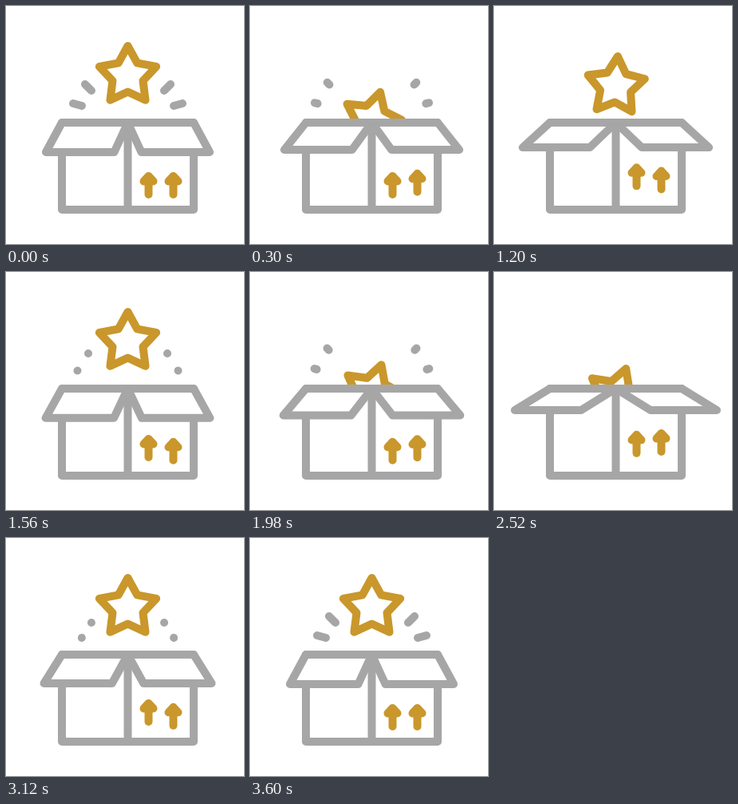
These frames come from a looping animation (298 px wide and 298 px high, 3630 ms). An HTML page:

```html
<!DOCTYPE html>
<html lang="en">
<head>
<meta charset="utf-8">
<title>Open box</title>
<style>
  html, body { margin: 0; height: 100%; overflow: hidden; background: #fff; }
  svg { display: block; width: 100%; height: 100%; }
  path { stroke: #a6a6a6; stroke-width: 10; stroke-linecap: round; stroke-linejoin: round; fill: #fff; }
  path.gold { stroke: #c9972b; }
  path.arrow { fill: #c9972b; }
</style>
</head>
<body>
<svg viewBox="0 0 298 298">
  <path class="gold" id="star" />
  <path d="M70 146H235V255H70ZM152.5 146V255" />
  <path id="leftFlap" />
  <path id="rightFlap" />
  <path class="gold arrow" id="leftArrow" d="M178.5 213L172.5 219.5H184.5ZV236" />
  <path class="gold arrow" id="rightArrow" d="M209.5 213L203.5 219.5H215.5ZV236" />
  <path id="sparks" />
</svg>
<script>
const LOOP = 3630, CYCLE = 1650, AXIS = 152.5;
const el = id => document.getElementById(id);
const star = el('star'), leftFlap = el('leftFlap'), rightFlap = el('rightFlap');
const leftArrow = el('leftArrow'), rightArrow = el('rightArrow'), sparks = el('sparks');

const progress = (t, from, to) => Math.min(1, Math.max(0, (t - from) / (to - from)));
const ease = (t, from, to) => {
  const u = progress(t, from, to);
  return u * u * (3 - 2 * u);
};
// Rises to 1 and returns to 0, once per cycle, twice per loop.
const twice = hump => t => hump(t) + hump(t - CYCLE);
const opening = twice(t => ease(t, 0, 840) - ease(t, 870, 1620));
const sinking = twice(t => ease(t, 0, 555) - ease(t, 565, 1386));

star.setAttribute('d', 'M' + Array.from({ length: 10 }, (_, i) => {
  const a = (i / 5 - 0.5) * Math.PI, r = i % 2 ? 20 : 37.5;
  return (r * Math.cos(a)).toFixed(2) + ' ' + (r * Math.sin(a)).toFixed(2);
}).join('L') + 'Z');

function flap(open, mirror) {
  const x = v => mirror ? 2 * AXIS - v : v;
  const y = 183 - 10 * open;
  return `M${x(70)} 146L${x(AXIS)} 146L${x(135.5 - 26.5 * open)} ${y}L${x(50 - 24 * open)} ${y}Z`;
}

// A spark is a short stroke sliding outwards along its own direction.
function spark(cx, cy, dx, dy, shift, half) {
  const [x1, y1, x2, y2] = [shift - half, shift + half]
    .flatMap(s => [cx + dx * s, cy + dy * s]);
  return `M${x1} ${y1}L${x2} ${y2}M${2 * AXIS - x1} ${y1}L${2 * AXIS - x2} ${y2}`;
}

function sparkPath(t) {
  const p = t < CYCLE ? t : t - CYCLE;
  let shift, half;
  if (p < 390) {
    shift = 9 * progress(p, 0, 390);
    half = 5.7 * (1 - progress(p, 0, 450));
  } else if (p >= 1440) {
    shift = -7.5 + 7.5 * progress(p, 1440, 1560);
    half = 0.01 + 5.69 * ease(p, 1560, 1650);
  } else return '';
  return spark(103, 102, -0.707, -0.707, shift, half) +
         spark(89.5, 123.5, -0.965, -0.26, shift, half);
}

function draw(now) {
  const t = now % LOOP, open = opening(t), sink = sinking(t);
  star.setAttribute('transform', `translate(${AXIS} ${87.5 + 100 * sink}) rotate(${29 * sink})`);
  leftFlap.setAttribute('d', flap(open, false));
  rightFlap.setAttribute('d', flap(open, true));
  leftArrow.setAttribute('transform', `translate(0 ${-11 * opening(t - 250)})`);
  rightArrow.setAttribute('transform', `translate(0 ${-11 * open})`);
  sparks.setAttribute('d', sparkPath(t));
}

const start = performance.now();
function tick() {
  draw(performance.now() - start);
  requestAnimationFrame(tick);
}
tick();
</script>
</body>
</html>
```
